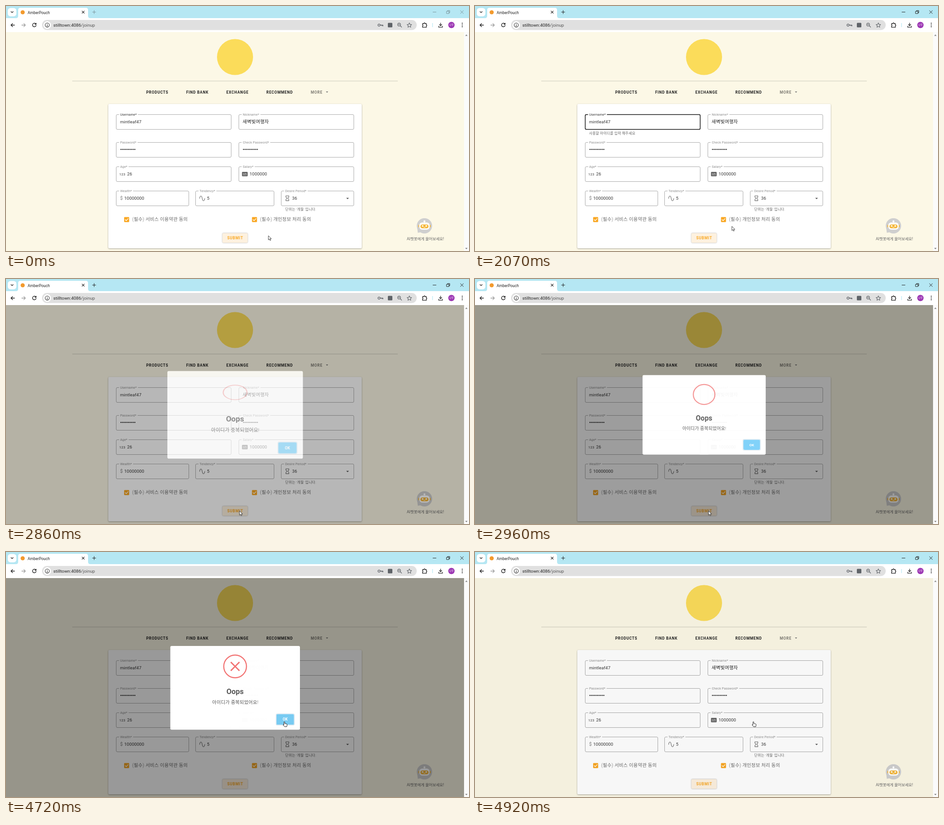
An HTML page that plays this animation: 1027x545 px, repeating every 5.41 s.

```html
<!DOCTYPE html>
<html lang="ko">
<head>
<meta charset="utf-8">
<title>Sign-up form</title>
<style>
  html, body { margin: 0; width: 100%; height: 100%; overflow: hidden; }
  svg { display: block; width: 100vw; height: 100vh; }
  text { font-family: Roboto, 'Noto Sans CJK KR', 'Noto Sans CJK', sans-serif; white-space: pre; }
  .line { fill: none; stroke-linecap: round; stroke-linejoin: round; }
  .card { filter: drop-shadow(0 1.5px 1.5px rgba(0,0,0,.35)); }
  .label { paint-order: stroke; stroke: #fff; stroke-width: 6; stroke-linejoin: round; }
</style>
</head>
<body>
<svg id="stage" viewBox="0 0 1027 545" preserveAspectRatio="none"></svg>
<script>
const LOOP = 5410, STEP = LOOP / 55;
const DARK = '#222', GREY = '#8d8d8d', BORDER = '#a9a9a9', ICON = '#5f6368', ORANGE = '#f9a825';

const rect = (x, y, w, h, fill, r = 0, extra = '') =>
  `<rect x="${x}" y="${y}" width="${w}" height="${h}" rx="${r}" fill="${fill}" ${extra}/>`;
const circle = (x, y, r, fill, extra = '') => `<circle cx="${x}" cy="${y}" r="${r}" fill="${fill}" ${extra}/>`;
const line = (d, color = DARK, width = 1.2, extra = '') =>
  `<path class="line" d="${d}" stroke="${color}" stroke-width="${width}" ${extra}/>`;
const shape = (d, fill, extra = '') => `<path d="${d}" fill="${fill}" ${extra}/>`;
const text = (s, x, y, size, fill = DARK, extra = '') =>
  `<text x="${x}" y="${y}" font-size="${size}" fill="${fill}" ${extra}>${s}</text>`;
const korean = (s, x, y, size, fill, extra = '') =>
  text(s, x, y, size, fill, `font-weight="300" letter-spacing=".15" ${extra}`);
const caps = (s, x, y, fill = DARK, extra = '') =>
  text(s, x, y, 8.4, fill, `font-weight="600" letter-spacing=".76" text-anchor="middle" ${extra}`);

const fields = [
  ['Username*', 244.5, 241.5, 255], ['Nickname*', 516.5, 241.5, 255],
  ['Password*', 244.5, 303.5, 255], ['Check Password*', 516.5, 303.5, 255],
  ['Age*', 244.5, 357.5, 255], ['Salary*', 516.5, 357.5, 255],
  ['Wealth*', 244.5, 411.5, 161], ['Tendency*', 420.5, 411.5, 174],
  ['Desire Period*', 610.5, 411.5, 161],
];
const FIELD_H = 33;

function browserBar() {
  return rect(0, 0, 1027, 58, '#b5e7f3') + rect(0, 27, 1027, 31, '#fff')
    + rect(4, 4.5, 19, 18.5, '#fff', 6) + line('M11 12.3l2.5 2.4 2.5-2.4')
    + shape('M22 27q5 0 5-5V9q0-5 5-5h145q5 0 5 5v13q0 5 5 5z', '#fff')
    + circle(37, 14, 4.6, '#f39a2d') + text('AmberPouch', 48, 17.6, 8.5)
    + line('M168.7 11.2l5 5m0-5l-5 5')
    + `<g id="controls" stroke="#222">` + ['M191.8 13.5h7.4m-3.7-3.7v7.4', 'M947 13.5h7', 'M977.5 11.8h5v5h-5zM979.3 11.5v-1.4h5v5h-1.4', 'M1008 10.2l6.6 6.6m0-6.6l-6.6 6.6']
      .map(d => `<path class="line" d="${d}"/>`).join('') + '</g>'
    + line('M19 42.5h-8m3.6-3.6L11 42.5l3.6 3.6', DARK, 1.4)
    + line('M35 42.5h8m-3.6-3.6l3.6 3.6-3.6 3.6', '#999', 1.3)
    + line('M66.2 40a4 4 0 1 0 .6 3.2M66.8 38.3v2.6h-2.6', DARK, 1.4)
    + rect(80, 31, 831, 22.5, '#e0e0e0', 11.2) + circle(91.5, 42.5, 8.5, '#fff')
    + line('M91.5 42v2.6m0-4.5v.1', DARK) + circle(91.5, 42.3, 4.6, 'none', `stroke="${DARK}" stroke-width="1.1"`)
    + text('stilltown:4086<tspan fill="#555">/joinup</tspan>', 105, 46, 9.85)
    + circle(827.5, 42.5, 2.4, 'none', `stroke="${ICON}" stroke-width="1.3"`) + line('M830 42.5h6v2m-2.3-2v1.4', ICON, 1.5)
    + rect(847, 37.5, 10, 10, ICON, 1.5)
    + circle(872, 41.4, 3.2, 'none', `stroke="${ICON}" stroke-width="1.2"`) + line('M874.6 44l3 3m-7-5.6h2.8', ICON)
    + line('M894.7 37.6l1.5 3.3 3.6.4-2.7 2.4.8 3.6-3.2-1.9-3.2 1.9.8-3.6-2.7-2.4 3.6-.4z', ICON, 1.1)
    + line('M924 39.2h3v-.8q1.3-2 2.6 0v.8h2.8v2.6q2.4 1.3 0 2.6v3H924v-2.8q2.4-1.3 0-2.6z', DARK, 1.4)
    + rect(945.5, 38, 1.2, 9, '#b5e7f3')
    + line('M964 37.8v6m-2.6-2.5l2.6 2.6 2.6-2.6M959.8 45v2.2h8.4V45', DARK, 1.3)
    + circle(988, 42.3, 7, '#9b35b3') + text('나무', 988, 44.3, 5.4, '#fff', 'text-anchor="middle"')
    + [38.4, 42.3, 46.2].map(y => circle(1012, y, 1.1, DARK)).join('');
}

function pageHeader() {
  return rect(0, 58, 1016, 487, '#fcf8e6') + rect(1016, 58, 11, 487, '#fbfbfb')
    + shape('M1018.6 66.5l2.6-3.2 2.6 3.2z', '#888') + shape('M1018.6 538l2.6 3.2 2.6-3.2z', '#888')
    + circle(508, 113.5, 40, '#fbdc5a')
    + rect(147, 166.4, 722, 1, '#cbc8ba')
    + caps('PRODUCTS', 335.5, 194.5) + caps('FIND BANK', 424.5, 194.5) + caps('EXCHANGE', 513.5, 194.5)
    + caps('RECOMMEND', 607, 194.5) + caps('MORE', 689, 194.5, '#7d7b73')
    + shape('M709.6 190.2h5l-2.5 2.6z', '#666');
}

function field([label, x, y, w], i) {
  return rect(x, y, w, FIELD_H, 'none', 2.5, `id="box${i}" stroke="${BORDER}"`)
    + text(label, x + 8.7, y + 2.7, 7.2, GREY, `class="label" id="label${i}" letter-spacing=".12"`);
}

function fieldContents() {
  const value = (s, x, y, extra = '') => text(s, x, y, 9.6, '#333', `letter-spacing=".15" ${extra}`);
  const dots = x => Array.from({ length: 10 }, (_, i) => circle(x + i * 3.42, 319, 1.2, DARK)).join('');
  const check = (x, label) => rect(x, 469.5, 11.2, 11.2, ORANGE, 1.4)
    + line(`M${x + 2.4} 475.2l2.3 2.3 4.4-4.6`, '#fff', 1.3) + korean(label, x + 18, 478, 10.5, '#6a6a6a');
  return value('mintleaf47', 253, 261.4, 'id="user"') + korean('새벽빛여행자', 524.8, 261.3, 10.4, '#222')
    + dots(255) + dots(526.8)
    + text('123', 251.3, 376.8, 7.6, '#666', 'font-weight="500" letter-spacing=".2"') + value('26', 268.8, 376.9)
    + rect(523.5, 369, 12.5, 9.8, '#606060', 1.4)
    + line('M526 372.6h2m1.5 0h4M526 375.5h4m1.6 0h2', '#fff', .9) + value('1000000', 540.3, 376.9)
    + text('$', 253.2, 431, 10, '#777') + value('10000000', 262.3, 430.9)
    + line('M429.5 428c1-7 4.6-7 5.7 0s4.6 7 5.7 0', '#707070', 1.2) + value('5', 445.8, 430.9)
    + line('M620.8 422.3h6.6v2.6l-2.4 2.8 2.4 2.8v2.6h-6.6v-2.6l2.4-2.8-2.4-2.8z', '#666', 1.1) + value('36', 634.8, 430.9)
    + shape('M754.7 426.7h6l-3 3z', '#555')
    + korean("단위는 '개월' 입니다.", 619.6, 455, 7.9, '#666')
    + check(262, '(필수) 서비스 이용약관 동의') + check(545.6, '(필수) 개인정보 처리 동의');
}

function chatBot() {
  return circle(928.2, 489, 17, '#cfcfcf') + shape('M912 492l1.5 12.6 9-1.8z', '#cfcfcf')
    + circle(928.2, 479, 2.2, '#fff') + rect(927.4, 479, 1.6, 4, '#fff')
    + rect(914.5, 486.5, 27.5, 6, '#f5b83d', 2.5) + rect(916.5, 481.5, 23.5, 16, '#fff', 7)
    + rect(919.3, 486, 18, 8.6, '#f5b83d', 4.3)
    + circle(924.2, 489.3, 1.8, '#fff') + circle(932.2, 489.3, 1.8, '#fff')
    + line('M926.6 492.2q1.7 1.2 3.4 0', '#fff', .9)
    + text('AI챗봇에게 물어보세요!', 930.3, 520.7, 8.5, '#666', 'text-anchor="middle"');
}

function dialog() {
  return rect(0, 58, 1016, 487, '#000', 0, 'opacity=".4"')
    + '<g id="modal">' + rect(364.5, 209, 287.5, 186.3, '#fff', 3)
    + '<g id="errorIcon">' + circle(0, 0, 25.2, 'none', 'stroke="#f27474" stroke-width="2.4"')
    + line('M-9.6-9.6L9.6 9.6M9.6-9.6L-9.6 9.6', '#f27474', 2.9, 'id="cross" style="stroke-linecap:butt"') + '</g>'
    + text('Oops', 508, 316, 16.4, '#595959', 'font-weight="600" text-anchor="middle"')
    + korean('아이디가 중복되었어요!', 508.5, 338.3, 10.4, '#555', 'text-anchor="middle"')
    + rect(598.6, 359.4, 41.4, 26, '#b9d3e4', 3.5) + rect(599.4, 360.2, 39.8, 24.4, '#fff', 3)
    + rect(600, 360.8, 38.6, 23.2, '#7cd1f9', 2.6, 'id="ok"')
    + text('OK', 619.3, 375.4, 8.4, '#fff', 'font-weight="700" text-anchor="middle"') + '</g>';
}

const stage = document.getElementById('stage');
stage.innerHTML = `<clipPath id="below"><path d="M240 276h300v40h-300z"/></clipPath>`
  + pageHeader() + browserBar()
  + rect(227, 218, 562, 321, '#fff', 2.5, 'class="card"')
  + fields.map(field).join('') + fieldContents()
  + '<g clip-path="url(#below)">' + korean('사용할 아이디를 입력 해주세요', 253, 286, 7.9, '#666', 'id="hint"') + '</g>'
  + rect(299, 252, 1, 12, '#111', 0, 'id="caret"')
  + rect(480, 505.3, 56, 21.5, '#fdf3df', 2.4, 'id="submit"') + caps('SUBMIT', 508.4, 519, ORANGE)
  + chatBot() + `<g id="overlay">${dialog()}</g>`
  + '<g id="arrow">' + shape('M0 0v9.3l2.2-2 1.5 3.3 1.6-.7-1.5-3.2h2.9z', '#fff', 'stroke="#111" stroke-width=".8"') + '</g>'
  + '<g id="beam">' + line('M-2-4.5h1.4l.6.5.6-.5H2M0-4v8M-2 4.5h1.4L0 4l.6.5H2', '#111', .9) + '</g>'
  + '<g id="hand">' + shape('M-1 1Q0-.8 1 1v3.4l4.2 1q1 .4.8 1.6L5.3 11.6H.4L-3 7.4q.3-1.2 2 .2z', '#fff', 'stroke="#111" stroke-width=".9"') + '</g>';

const $ = id => document.getElementById(id);
const set = (id, attrs) => { for (const k in attrs) $(id).setAttribute(k, attrs[k]); };
const show = (id, on) => set(id, { visibility: on ? 'visible' : 'hidden' });
const clamp = p => Math.min(1, Math.max(0, p));

// The CSS "ease" curve, solved by bisection.
function ease(p) {
  if (p <= 0 || p >= 1) return clamp(p);
  const bezier = (s, a, b) => 3 * s * (1 - s) ** 2 * a + 3 * s * s * (1 - s) * b + s ** 3;
  let lo = 0, hi = 1;
  for (let i = 0; i < 20; i++) {
    const mid = (lo + hi) / 2;
    if (bezier(mid, .25, .25) < p) lo = mid; else hi = mid;
  }
  return bezier(lo, .1, 1);
}

// Interpolates one column of [time, ...values] keys.
function track(keys, t, column = 1, curve = p => p) {
  const i = keys.findIndex(k => k[0] > t);
  if (i < 0) return keys[keys.length - 1][column];
  if (i === 0) return keys[0][column];
  const a = keys[i - 1], b = keys[i];
  return a[column] + (b[column] - a[column]) * curve((t - a[0]) / (b[0] - a[0]));
}

const cursorPath = [
  [0, 582, 511], [500, 582, 511], [590, 576, 492], [790, 515, 395], [980, 437, 288], [1080, 422, 270],
  [1370, 413, 265], [1570, 413, 266], [1672, 422, 297], [1870, 485, 385], [2065, 570, 490],
  [2163, 540, 512], [2262, 519, 511], [2360, 518, 516], [3840, 518, 516], [3934, 526, 496],
  [4033, 545, 440], [4131, 575, 370], [4230, 600, 340], [4328, 615, 364], [4426, 617.5, 377],
];
const hintKeys = [[1100, 0, -6], [1270, 1, 0], [2557, 1, 0], [2656, .6, -4], [2754, .22, -6], [2830, 0, -6]];
const popKeys = [[0, .5], [135, 1.05], [240, .95], [300, 1]];
const crossKeys = [[250, .4, 15, 0], [400, 1.15, -3.6, .8], [500, 1, 0, 1]];
const POP = 2711, FADE_IN = 2728, FADE_OUT = 4720;

function moveCursor(t) {
  const x = track(cursorPath, t, 1), y = track(cursorPath, t, 2);
  const overField = t < 2557 && fields.some(([, fx, fy, w]) => x > fx && x < fx + w && y > fy && y < fy + FIELD_H);
  const overButton = (t > 2160 && t < 2640) || t > 4320;
  const kind = overButton ? 'hand' : overField ? 'beam' : 'arrow';
  for (const id of ['arrow', 'beam', 'hand']) show(id, id === kind);
  set(kind, { transform: `translate(${x} ${y})` });
}

function drawForm(t) {
  const focused = t >= 1175 && t < 2550;
  set('controls', { stroke: t < 585 ? '#7b959c' : DARK });
  set('box0', { stroke: focused ? '#111' : BORDER, 'stroke-width': focused ? 1.5 : 1 });
  set('label0', { fill: focused || t < 190 ? '#333' : GREY });
  show('caret', focused && (t - 1175) % 1000 < 510);
  set('hint', { opacity: track(hintKeys, t, 1), transform: `translate(0 ${track(hintKeys, t, 2)})` });
  const hovered = t > 2160 && t < 2840;
  set('submit', {
    fill: t > 2550 && t < 2840 ? '#fce0ac' : hovered ? '#fcecca' : '#fdf1df',
    style: `filter:drop-shadow(0 ${hovered ? 1.6 : .9}px ${hovered ? 1.8 : 1}px rgba(0,0,0,.38))`,
  });
}

function drawDialog(t) {
  const age = t - POP;
  const fade = ms => ease((t - FADE_IN) / ms) * (1 - ease((t - FADE_OUT) / ms));
  const scale = track(popKeys, age, 1, ease);
  const turn = ease(age / 500), tilt = Math.cos((1 - turn) * 100 * Math.PI / 180);
  show('overlay', age > 0);
  set('overlay', { opacity: fade(300) });
  set('modal', { opacity: fade(200), transform: `translate(508.2 302.2) scale(${scale}) translate(-508.2 -302.2)` });
  set('errorIcon', { opacity: turn, transform: `translate(508.2 254.5) scale(1 ${tilt})` });
  const [size, drop, alpha] = [1, 2, 3].map(c => track(crossKeys, age, c, ease));
  set('cross', { opacity: alpha, transform: `translate(0 ${drop}) scale(${size})` });
  set('ok', { fill: t > 4320 ? '#78cbf2' : '#7cd1f9' });
}

const start = performance.now();
function frame() {
  const elapsed = (performance.now() - start) % LOOP;
  const t = Math.floor((elapsed + 5) / STEP) % 55 * STEP;
  drawForm(t);
  drawDialog(t);
  moveCursor(t);
  set('caret', { x: 253.4 + $('user').getComputedTextLength() });
  requestAnimationFrame(frame);
}
frame();
</script>
</body>
</html>
```
